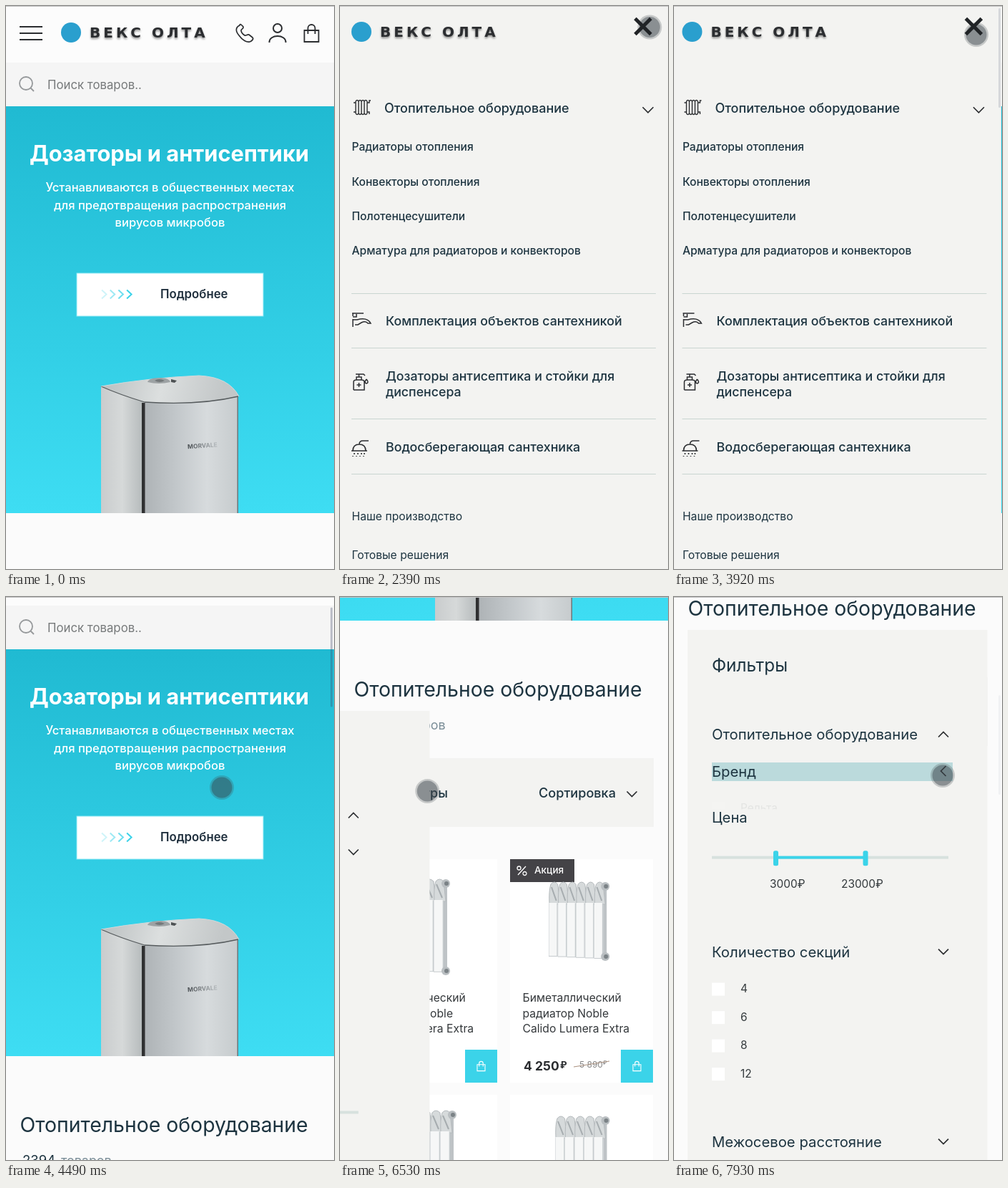
Animation of 459 by 786 pixels, one loop 8000 ms. Source, as an HTML page with a canvas:

```html
<!DOCTYPE html>
<html lang="ru">
<head>
<meta charset="utf-8">
<title>Мобильный магазин</title>
<style>
html, body { margin: 0; width: 100%; height: 100%; overflow: hidden; background: #fcfcfc; }
canvas { display: block; width: 459px; height: 786px; }
</style>
</head>
<body>
<canvas id="stage"></canvas>
<script>
const W = 459, H = 786, LOOP = 8000, STEP = 81.65;
const FONT = 'Inter, "Noto Sans", sans-serif';
const INK = '#1d3440', DARK = '#2b2d30', PALE = '#f3f3f1', CYAN = '#3bd3e9';
const canvas = document.getElementById('stage');
const ratio = window.devicePixelRatio || 1;
canvas.width = W * ratio;
canvas.height = H * ratio;
const c = canvas.getContext('2d');

// ---- timing ----
const unit = (t, a, b) => Math.min(1, Math.max(0, (t - a) / (b - a)));
const smooth = u => u * u * (3 - 2 * u);
const cubic = u => u < .5 ? 4 * u ** 3 : 1 - 4 * (1 - u) ** 3;
const ramp = (t, a, b) => smooth(unit(t, a, b));

const CURSOR = [
  [160, 480, 764], [900, 38, 30], [1820, 38, 30], [2230, 440, 57], [2390, 433, 28],
  [3260, 433, 28], [3670, 423, 40], [3925, 423, 40], [4491, 302, 266],
  [5000, 302, 266], [5600, 23, 281], [5700, 23, 281], [6100, 52, 272],
  [6350, 52, 272], [6940, 362, 268], [7150, 362, 268], [7600, 376, 249]
];
function cursorAt(t) {
  let i = 0;
  while (i < CURSOR.length - 2 && t > CURSOR[i + 1][0]) i++;
  const [t0, x0, y0] = CURSOR[i], [t1, x1, y1] = CURSOR[i + 1];
  const u = ramp(t, t0, t1);
  return [x0 + (x1 - x0) * u, y0 + (y1 - y0) * u];
}

// ---- drawing helpers ----
function text(s, x, y, size, color, weight = 400, align = 'left') {
  c.font = `${weight} ${size}px ${FONT}`;
  c.textAlign = align;
  c.textBaseline = 'middle';
  c.fillStyle = color;
  c.fillText(s, x, y + .7);
}
function box(x, y, w, h, color) {
  c.fillStyle = color;
  c.fillRect(x, y, w, h);
}
function disc(x, y, r, color) {
  c.fillStyle = color;
  c.beginPath();
  c.arc(x, y, r, 0, 7);
  c.fill();
}
function line(d, color = DARK, width = 2) {
  c.strokeStyle = color;
  c.lineWidth = width;
  c.stroke(new Path2D(d));
}
function shape(d, fill) {
  c.fillStyle = fill;
  c.fill(new Path2D(d));
}
function at(x, y, draw) {
  c.save();
  c.translate(x, y);
  draw();
  c.restore();
}
function blend(x0, y0, x1, y1, ...colors) {
  const g = c.createLinearGradient(x0, y0, x1, y1);
  colors.forEach((k, i) => g.addColorStop(i / (colors.length - 1), k));
  return g;
}
function chevron(x, y, angle = 0, size = 7.5) {
  at(x, y, () => {
    c.rotate(angle);
    line(`M${-size} ${-size / 2}L0 ${size / 2}L${size} ${-size / 2}`, DARK, 1.7);
  });
}
function bag(x, y, s, color, width) {
  at(x, y, () => {
    c.scale(s, s);
    line('M-10 -4H10V12H-10ZM-5 1V-7A5 5 0 0 1 5 -7V1', color, width / s);
  });
}

function logo(x, y) {
  disc(x + 13, y + 20, 14, '#2a9fce');
  c.save();
  c.shadowColor = 'rgba(0,0,0,.45)';
  c.shadowBlur = 3;
  c.shadowOffsetY = 2;
  c.font = 'bold 20px "DejaVu Sans", sans-serif';
  c.letterSpacing = '4px';
  c.textAlign = 'left';
  c.textBaseline = 'middle';
  c.fillStyle = DARK;
  c.fillText('ВЕКС ОЛТА', x + 39, y + 22);
  c.restore();
}

// ---- page ----
function header() {
  box(0, 0, W, 79, '#fcfcfc');
  line('M19 29H51M19 38H51M19 47H51');
  logo(78, 17);
  line('M327 27C321 30 321 35 326 41C331 48 337 51 341 50C344 49 347 46 345 44L340 40C338 39 336 42 334 41C331 39 329 37 329 34C329 32 333 32 332 29L329 26C328 25 327 26 327 27Z', DARK, 1.7);
  line('M386 31A6 6 0 1 1 374 31A6 6 0 1 1 386 31M368.5 51C368 39 392 39 391.5 51', DARK, 2);
  bag(427.5, 38, 1, DARK, 1.8);
  box(0, 79, W, 61, '#f5f5f5');
  line('M37 108A9 9 0 1 1 19 108A9 9 0 1 1 37 108M34.5 114.5L39 119', '#96999b', 1.8);
  text('Поиск товаров..', 58, 110.3, 16.8, '#777a7b');
}

function dispenser() {
  shape('M133 531L194 550V708H133Z', blend(133, 0, 192, 0, '#c9cccd', '#d6d9d9', '#b5babb'));
  shape('M194 552Q270 556 325 544V708H194Z', blend(194, 0, 325, 0, '#aeb3b6', '#c2c7ca', '#d7dbdd', '#c6cbcd'));
  shape('M133 531Q200 519 270 516Q312 518 326 545Q270 558 194 553Q160 543 133 531Z', blend(133, 516, 300, 555, '#b9bebf', '#dcdfdf', '#c3c7c8'));
  line('M133 531Q160 543 194 553Q270 558 325 545', '#565b5d', 1.3);
  line('M133 531Q200 519 270 516Q312 518 326 545', '#d3d9da', 1);
  box(190, 554, 4.5, 154, '#2f3031');
  box(323.5, 546, 1.5, 162, '#69777b');
  shape('M198 525Q200 519 217 519Q229 520 230 525Q214 529 198 525Z', '#9da2a4');
  shape('M208 523Q214 519 222 523Q215 527 208 523Z', '#73787a');
  shape('M231 521L239 523L236 526L231 525Z', '#4d5153');
  at(254, 615, () => {
    c.rotate(-.07);
    text('MORVALE', 0, 0, 8.5, blend(0, 0, 38, 0, '#474c50', '#b0b5b8'), 700);
  });
}

function banner() {
  box(0, 140, W, 568, blend(0, 140, 0, 708, '#20bad2', '#3eddf3'));
  text('Дозаторы и антисептики', 228.5, 207.5, 30.8, '#fff', 700, 'center');
  ['Устанавливаются в общественных местах', 'для предотвращения распространения', 'вирусов микробов']
    .forEach((s, i) => text(s, 229.5, 253.5 + i * 24.4, 16.6, '#fff', 500, 'center'));
  box(98.5, 372.5, 262, 61, '#8ae8f4');
  box(99.5, 373.5, 260, 59, '#fff');
  for (let i = 0; i < 4; i++) {
    c.globalAlpha = .25 + i * .25;
    at(134 + i * 11.7, 402.5, () => line('M0 -6L6.5 0L0 6', CYAN, 2));
  }
  c.globalAlpha = 1;
  text('Подробнее', 216, 402.5, 16.8, '#1f2f3d', 600);
  dispenser();
}

function radiator(x, y, n, w, h) {
  at(x, y, () => {
    const end = n * w;
    box(end, 10, 5, h - 22, '#bec3c6');
    for (let i = 0; i < n; i++) {
      at(i * w, 0, () => {
        const fin = `M1 33Q0 14 3 5Q8 -1 ${w} 5L${w + 3} 33Z`;
        shape(fin, '#d6dadb');
        line(fin, '#b5babd', 1);
        line(`M4 9L${w - 2} 28`, '#a6acaf', 2);
        const low = h - 8 + i * .6;
        box(0, 32, w, low - 32, '#c6cbce');
        box(.5, 31, w - 1.8, low - 32, '#f6f7f7');
      });
    }
    for (const cy of [8, h - 8]) {
      disc(end + 3, cy, 6, '#b9bec1');
      disc(end + 4, cy, 3, '#7b8286');
    }
  });
}

function card(x, y, sale) {
  box(x, y, 200, 312, '#fff');
  if (sale) {
    box(x, y, 90, 32, '#444347');
    at(x, y, () => line('M11 22L22 10M15 12.5A2.5 2.5 0 1 1 10 12.5A2.5 2.5 0 1 1 15 12.5M23 20A2.5 2.5 0 1 1 18 20A2.5 2.5 0 1 1 23 20', '#fff', 1.3));
    text('Акция', x + 34, y + 15.5, 13.5, '#fff', 500);
  }
  ['Биметаллический', 'радиатор Noble', 'Calido Lumera Extra']
    .forEach((s, i) => text(s, x + 17.5, y + 194 + i * 21.5, 15.7, '#34383b'));
  text('4 250', x + 19, y + 289, 17.5, DARK, 700);
  text('₽', x + 70, y + 287, 13, DARK, 700);
  if (sale) {
    text('5 890', x + 97, y + 287, 12, '#858585');
    text('₽', x + 130, y + 284, 8, '#858585');
    line(`M${x + 89} ${y + 290}L${x + 139} ${y + 282}`, '#a98f7d', 1);
  }
  box(x + 155, y + 266, 45, 46, CYAN);
  bag(x + 177.5, y + 289, .55, '#fff', 1.1);
}

function catalog() {
  box(0, 708, W, 900, '#fbfbfb');
  text('Отопительное оборудование', 19.5, 804.5, 28.4, INK);
  text('2394', 23, 854, 18.5, INK);
  text('товаров', 77, 854, 17.9, '#7b8e98');
  box(19, 900, 420, 96, PALE);
  text('Фильтры', 71, 949, 18, INK, 500);
  text('Сортировка', 278, 949, 18.1, INK, 500);
  chevron(408.5, 950, 0, 7);
  card(20, 1041, false);
  card(238, 1041, true);
  card(20, 1370, false);
  card(238, 1370, false);
  radiator(89, 1067, 4, 14, 138);
  radiator(292, 1071, 6, 12.7, 114);
  radiator(98, 1390, 4, 14, 138);
  radiator(301, 1398, 5, 13.5, 120);
}

function option(label, y) {
  box(53, y - 9, 18, 18, '#fff');
  text(label, 93, y - .5, 15.5, '#343a3d');
}

function filters(t) {
  if (t < 6350) return;
  const shift = 500 * (1 - ramp(t, 6350, 6868));
  const fold = ramp(t, 7680, 7930);
  const extra = 244 * (1 - fold);
  const title = (s, y) => text(s, 53, y, 20.3, INK);
  box(19 - shift, 834, 419.5 + shift * .126, 900, PALE);
  at(-shift, 0, () => {
    text('Фильтры', 53, 883.5, 24.3, INK);
    title('Отопительное оборудование', 980);
    chevron(377, 980, Math.PI, 7);
    c.globalAlpha = unit(t, 7580, 7700);
    box(53, 1019, 337, 26, '#bbdadc');
    c.globalAlpha = 1;
    title('Бренд', 1032);
    chevron(377, 1031, Math.PI * unit(t, 7840, 8000), 7);

    c.save();
    c.beginPath();
    c.rect(53, 1072, 340, extra + 11);
    c.clip();
    c.globalAlpha = Math.max(.08, 1 - fold);
    ['Рельта', 'Норвиа', 'Тервин', 'Салмо', 'Кельвар', 'Орвент']
      .forEach((s, i) => option(s, 1083 + i * 39.6));
    c.restore();

    c.translate(0, extra);
    title('Цена', 1095);
    box(53, 1148.5, 331, 4, '#d7e1de');
    box(142, 1148.5, 126, 4, CYAN);
    for (const x of [139, 264.5]) {
      c.fillStyle = CYAN;
      c.beginPath();
      c.roundRect(x, 1141, 7, 21, 2.5);
      c.fill();
    }
    text('3000₽', 134, 1188, 15.4, '#343a3d');
    text('23000₽', 234, 1188, 15.4, '#343a3d');
    title('Количество секций', 1283);
    chevron(377, 1282, 0, 7);
    ['4', '6', '8', '12'].forEach((s, i) => option(s, 1334.5 + i * 39.5));
    title('Межосевое расстояние', 1548.5);
    chevron(377, 1547, 0, 7);
  });
}

// ---- side menu ----
const menuShift = t => 462.5 * (cubic(unit(t, 980, 1632)) - cubic(unit(t, 3844, 4400)) - 1);
const menuScroll = t => 12 * (ramp(t, 2660, 2980) - ramp(t, 3220, 3670));

function menuIcons() {
  line('M22 133V150M26 133V150M30 133V150M34 133V150M38 133V150M22 133Q24 130 26 133Q28 130 30 133Q32 130 34 133Q36 130 38 133M22 150Q24 153 26 150Q28 153 30 150Q32 153 34 150Q36 153 38 150M19 135H22M19 148H22M38 135H41V132H43M38 148H41V151', DARK, 1.4);
  line('M17 429H33M18 429V433M18 437V448M18 434H23V430M18 438H24Q38 434 43 443H39Q36 439 30 442L25 445H21', DARK, 1.5);
  line('M19 536V525Q19 522 23 522H30Q34 522 34 525V536H19M23 522V518H30V522M26.5 518V514M22 514H33L35 516M26.5 526V532M23.5 529H29.5M37 521Q33 526 37 527Q41 526 37 521', DARK, 1.5);
  line('M40 607H32Q27 607 27 612M18 621Q18 612 27 612Q36 612 36 621ZM16 621H38M20 624V626M25 624V626M30 624V626M34 624V626M18 628V629M23 628V629M28 628V629M33 628V629', DARK, 1.6);
}

function menu() {
  logo(17, 16);
  menuIcons();
  text('Отопительное оборудование', 62, 143, 18, INK, 500);
  chevron(431, 145);
  ['Радиаторы отопления', 'Конвекторы отопления', 'Полотенцесушители', 'Арматура для радиаторов и конвекторов']
    .forEach((s, i) => text(s, 16.5, 197 + i * 48.2, 15.6, INK, 500));
  for (const y of [401, 477, 576, 653]) box(16, y, 426, 1, '#c9d5d1');
  text('Комплектация объектов сантехникой', 64, 440, 17.75, INK, 500);
  text('Дозаторы антисептика и стойки для', 64, 517, 17.75, INK, 500);
  text('диспенсера', 64, 539, 17.75, INK, 500);
  text('Водосберегающая сантехника', 64, 616, 17.9, INK, 500);
  text('Наше производство', 16.5, 713, 15.7, INK);
  text('Готовые решения', 16.5, 767, 15.7, INK);
}

// ---- overlay ----
function scrollbar(t, scroll) {
  const alpha = .16 * ramp(t, 2680, 2980) + .16 * ramp(t, 4380, 4480)
    - .32 * ramp(t, 5000, 5600) + .05 * ramp(t, 7150, 7300);
  if (alpha < .005) return;
  c.fillStyle = `rgba(65,75,105,${alpha})`;
  c.beginPath();
  c.roundRect(454, 3 + scroll * .17, 3, 139, 1.5);
  c.fill();
}

function pointer(t) {
  const [x, y] = cursorAt(t);
  disc(x, y, 17, 'rgba(66,72,78,.25)');
  disc(x, y, 14.5, 'rgba(56,64,72,.42)');
}

function draw(t) {
  c.setTransform(ratio, 0, 0, ratio, 0, 0);
  box(0, 0, W, H, '#fcfcfc');
  const scroll = Math.round(675 * ramp(t, 4389, 4910) + 113 * ramp(t, 7150, 7600));
  at(0, -scroll, () => {
    header();
    banner();
    catalog();
    filters(t);
  });
  const x = menuShift(t), y = -menuScroll(t);
  box(0, 0, 462.5 + x, H, PALE);
  at(x, y, menu);
  scrollbar(t, scroll);
  pointer(t);
  // the close mark stays readable above the pointer
  at(x, y, () => line('M413 17.5L435 39.5M435 17.5L413 39.5', '#202326', 5));
  box(0, 0, W, 1, '#c2c2c2');
}

const start = performance.now();
function tick(now) {
  const t = Math.max(0, now - start) % LOOP;
  draw(Math.floor((t + 6) / STEP) * STEP);
  requestAnimationFrame(tick);
}
draw(0);
requestAnimationFrame(tick);
</script>
</body>
</html>
```
